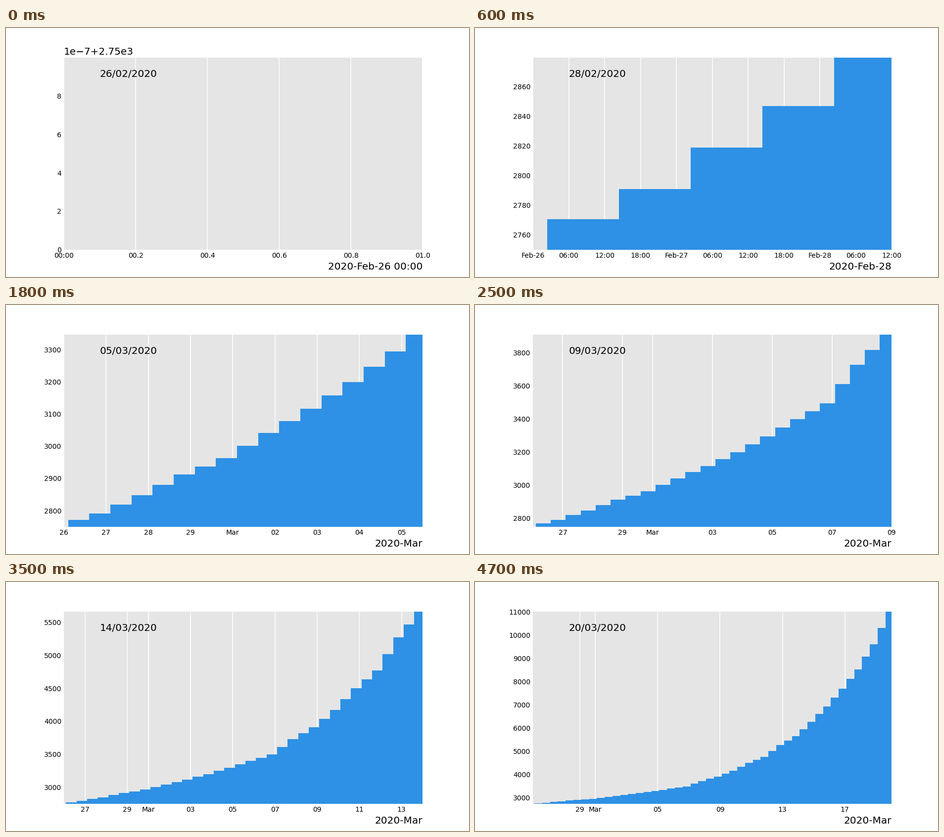
A matplotlib script for the animation above (4800 ms loop, 936x504 px).

```python
import numpy as np
import matplotlib.pyplot as plt
import matplotlib.dates as mdates
from matplotlib.animation import FuncAnimation

plt.rcParams["font.family"] = "DejaVu Sans"

BASE = 2750
DAILY = [2750, 2791, 2847, 2912, 2963, 3041, 3116, 3199, 3294.5, 3398, 3494,
         3727, 3906, 4174, 4504, 4771, 5273, 5661, 6266, 6942, 7704, 8531,
         9617, 11008]
START = mdates.date2num(np.datetime64("2020-02-26"))
SECOND = 1 / 86400
SLOTS = 48

# Two samples per day, halfway values interpolated
days = np.arange(0, len(DAILY) - 0.5, 0.5)
totals = np.interp(days, np.arange(len(DAILY)), DAILY)

fig = plt.figure(figsize=(6.5, 3.5), dpi=144, facecolor="white")
ax = fig.add_axes([0.125, 0.12 - 0.01, 0.775, 0.77], facecolor="#e5e5e5")
ax.spines[:].set_visible(False)
ax.set_axisbelow(True)
ax.grid(axis="x", color="white", linewidth=0.8)

# Bars are wider than their spacing, so each one covers part of the previous
bars = ax.bar(START + days[1:], totals[1:] - BASE, width=0.8, bottom=BASE,
              color="#2e91e5", linewidth=0)
label = ax.text(0.1, 0.9, "", transform=ax.transAxes, fontsize=10)

locator = mdates.AutoDateLocator()
ax.xaxis.set_major_locator(locator)
ax.xaxis.set_major_formatter(mdates.ConciseDateFormatter(locator))
ax.tick_params(length=0, pad=2.5, labelsize=7, labelcolor="black")
for axis in (ax.xaxis, ax.yaxis):
    axis.get_offset_text().set(size=10, color="black")


def update(slot):
    step = max(slot - 1, 0)
    now = START + days[step]
    for i, bar in enumerate(bars):
        bar.set_visible(i < step)
    # The first view has no extent yet, so give it a minimal one
    ax.set_xlim(START, max(now, START + 1.00001 * SECOND))
    ax.set_ylim(BASE - 1e-10, max(totals[step], BASE + 9.995e-7))
    label.set_text(mdates.num2date(now).strftime("%d/%m/%Y"))
    return [*bars, label]


anim = FuncAnimation(fig, update, frames=SLOTS, interval=100,
                     init_func=lambda: update(0), repeat=True, repeat_delay=0)
plt.show()
```
